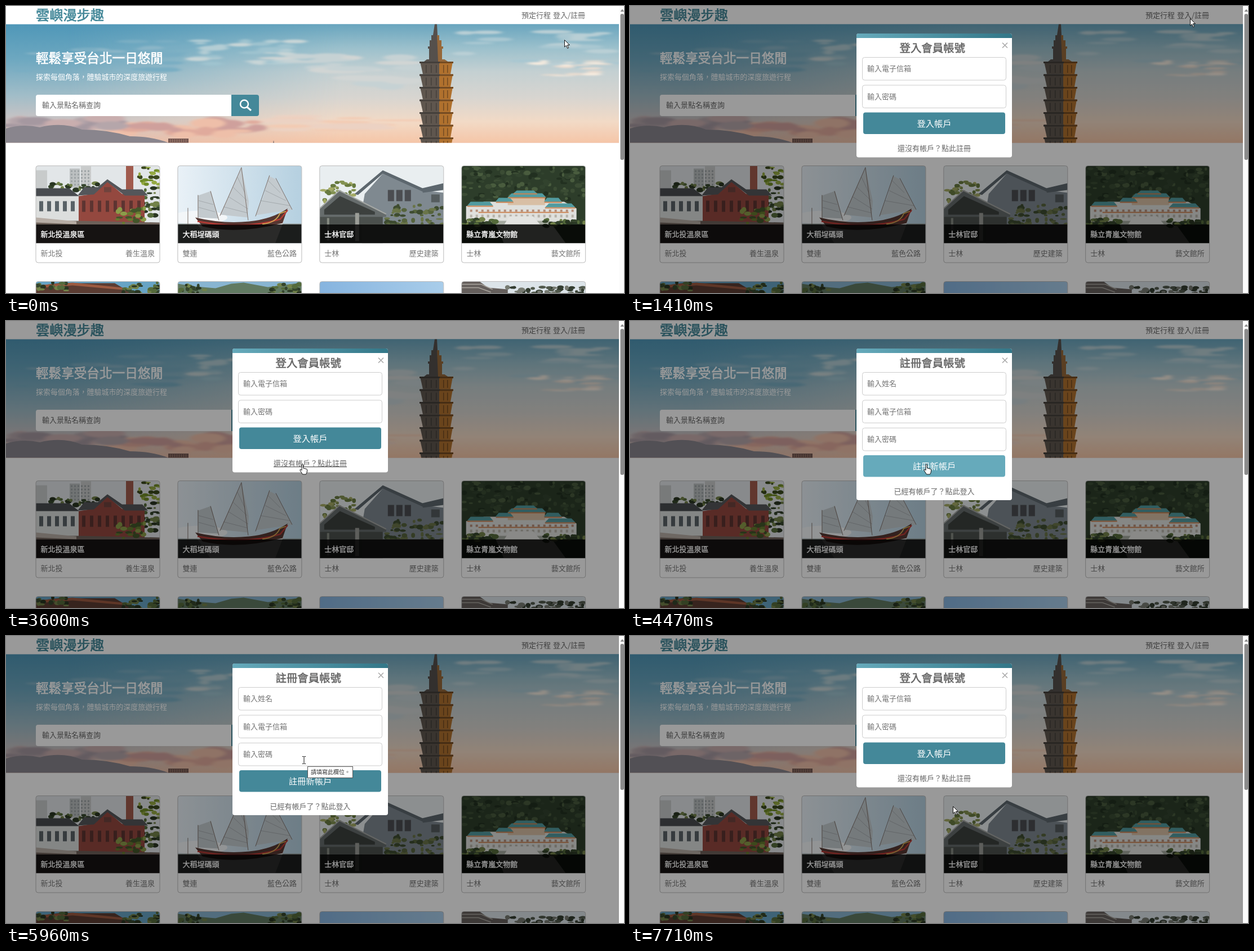
Animation, 1097 px wide and 511 px high, one loop 8000 ms. Source, as an HTML page:

```html
<!DOCTYPE html>
<html lang="zh-Hant">
<head>
<meta charset="utf-8">
<style>
html, body { margin: 0; width: 100%; height: 100%; overflow: hidden; background: #fff; }
svg { display: block; width: 1097px; height: 511px; font-family: "Noto Sans CJK TC", "Noto Sans CJK", sans-serif; }
</style>
</head>
<body>
<svg id="stage" viewBox="0 0 1097 511">
  <defs>
    <linearGradient id="sky" x1="0" y1="0" x2="0" y2="1">
      <stop offset="0" stop-color="#4f97b8"/><stop offset=".3" stop-color="#6ea8c0"/>
      <stop offset=".6" stop-color="#a1bdc8"/><stop offset=".8" stop-color="#c8c3c4"/><stop offset="1" stop-color="#e6bcaa"/>
    </linearGradient>
    <linearGradient id="warm" x1="0" y1="0" x2="0" y2="1">
      <stop offset="0" stop-color="#69a5be"/><stop offset=".2" stop-color="#9bc0cc"/><stop offset=".4" stop-color="#c4d0d2"/>
      <stop offset=".62" stop-color="#d8d5d0"/><stop offset=".82" stop-color="#f2dac6"/><stop offset="1" stop-color="#f5c5a7"/>
    </linearGradient>
    <linearGradient id="reveal"><stop offset=".1" stop-color="#000"/><stop offset=".55" stop-color="#fff"/></linearGradient>
    <mask id="right"><rect y="32" width="1088" height="212" fill="url(#reveal)"/></mask>
    <linearGradient id="bar"><stop offset="0" stop-color="#66aabb"/><stop offset="1" stop-color="#337788"/></linearGradient>
    <linearGradient id="air"><stop offset="0" stop-color="#e9f1f7"/><stop offset="1" stop-color="#b5d0e0"/></linearGradient>
    <linearGradient id="blue"><stop offset="0" stop-color="#86b4df"/><stop offset="1" stop-color="#a9cdea"/></linearGradient>
    <filter id="soft" x="-30%" y="-80%" width="160%" height="260%"><feGaussianBlur stdDeviation="4 1.5"/></filter>
    <clipPath id="heroClip"><rect y="32.5" width="1088" height="211"/></clipPath>
    <clipPath id="photoClip"><path d="M0 138V4q0-4 4-4h212q4 0 4 4v134z"/></clipPath>
  </defs>
  <g id="page"></g>
  <g id="dialog"></g>
  <path d="M1088 0h9v511h-9z" fill="#fcfcfc"/>
  <path d="M1090.500 10l3.500-4.500 3 4.500z" fill="#888"/>
  <rect x="1090.500" y="14" width="6.500" height="260" rx="3" fill="#8b8b8b"/>
  <path id="cursor" stroke="#111" stroke-linejoin="round"/>
</svg>
<script>
const $ = id => document.getElementById(id);
const text = (x, y, size, str, fill = '#666', more = '') =>
  `<text x="${x}" y="${y}" font-size="${size}" fill="${fill}" ${more}>${str}</text>`;
// Medium weight: regular glyphs with a thin outline
const medium = (x, y, size, str, fill) =>
  text(x, y, size, str, fill, `stroke="${fill}" stroke-width="${size * .03}"`);
const shape = (fill, d) => `<path fill="${fill}" d="${d}"/>`;
const line = (color, width, d) => `<path fill="none" stroke="${color}" stroke-width="${width}" d="${d}"/>`;
const box = (x, y, w, h, fill, more = '') =>
  `<rect x="${x}" y="${y}" width="${w}" height="${h}" fill="${fill}" ${more}/>`;
const oval = (x, y, rx, ry, fill) => `<ellipse cx="${x}" cy="${y}" rx="${rx}" ry="${ry}" fill="${fill}"/>`;
const MID = 'text-anchor="middle"';

let seed = 7;
const rnd = () => (seed = seed * 16807 % 2147483647) / 2147483647;

// Ovals scattered inside a rectangle
function scatter(x, y, w, h, n, colors, rx = 4.5, ry = 3) {
  let s = '';
  for (let i = 0; i < n; i++)
    s += oval(x + rnd() * w, y + rnd() * h, rx * (.5 + rnd()), ry * (.5 + rnd()), colors[i % colors.length]);
  return s;
}

function windows(x, y, cols, rows, dx, dy, w, h, fill) {
  let s = '';
  for (let i = 0; i < cols * rows; i++) s += box(x + i % cols * dx, y + Math.floor(i / cols) * dy, w, h, fill);
  return s;
}

function tower() {
  let s = shape('#55504c', 'M761 32h4l1 20h3v9h4v11h3v4h-2v19h4l6 4h-42l5-4h4V76h-2v-4h3V61h3v-9h3z')
    + shape('#96683a', 'M765 52h4v9h4v11h3v4h-2v19h4l6 4h-17z');
  for (let y = 99; y < 244; y += 22.5) {
    s += shape('#5f564e', `M735 ${y}H771V${y + 22.5}H740z`)
      + shape('#b0712e', `M769 ${y}H793L789 ${y + 22.5}H769z`)
      + shape('#443f3b', `M734 ${y}h36v3h-36zM745 ${y + 6}h1.500v14h-1.500zM754 ${y + 6}h1.500v14h-1.500zM763 ${y + 6}h1.500v14h-1.500z`)
      + shape('#744b22', `M770 ${y}h24v3h-24zM776 ${y + 6}h1.500v14h-1.500zM783 ${y + 6}h1.500v14h-1.500z`);
  }
  return s;
}

function hero() {
  const clouds = scatter(30, 60, 280, 60, 26, ['#79adc3', '#8ab5c7'], 24, 3)
    + scatter(330, 62, 190, 42, 30, ['#b4cdd4', '#c8d5d7', '#9fc3cf'], 18, 3)
    + scatter(480, 85, 250, 60, 24, ['#c6d2d4', '#d1d5d4'], 36, 4)
    + scatter(800, 45, 270, 65, 24, ['#b9cfd5', '#a9c7d1'], 28, 3)
    + scatter(940, 97, 120, 30, 18, ['#fbeee0', '#ecddd0'], 15, 1.5)
    + scatter(480, 195, 240, 30, 16, ['#f3cbb3', '#ecd2c3'], 45, 3)
    + scatter(200, 205, 250, 25, 30, ['#e0aa9c', '#cfa09c', '#eebfa9'], 22, 6)
    + scatter(0, 200, 210, 20, 18, ['#b5a6aa', '#a598a0', '#c9aeae'], 26, 6);
  return `<g clip-path="url(#heroClip)">${box(0, 32, 1088, 212, 'url(#sky)')}
    ${box(0, 32, 1088, 212, 'url(#warm)', 'mask="url(#right)"')}
    <g filter="url(#soft)">${clouds}</g>
    ${shape('#89858d', 'M0 218q30-9 60-2 40-10 75 4 45 0 85 12 40 0 70 12H0z')}
    ${shape('#765953', 'M288 236h36v8h-36z')}${windows(291, 237, 8, 1, 4, 4, 1, 7, '#9b7a6b')}
    ${shape('#6c6265', 'M474 244l1-5 1 5z')}${tower()}</g>`
    + medium(53, 101, 22.6, '輕鬆享受台北一日悠閒', '#fff')
    + text(53, 131, 12.95, '探索每個角落，體驗城市的深度旅遊行程', '#fff')
    + box(53, 158, 360, 38, '#fff', 'rx="4"')
    + shape('#448899', 'M400 158h45q4 0 4 4v30q0 4-4 4h-45z')
    + text(64, 181, 13, '輸入景點名稱查詢')
    + `<circle cx="423" cy="174.500" r="7" fill="none" stroke="#fff" stroke-width="2.500"/>` + line('#fff', 3, 'M428 180l7 6');
}

const GREEN = ['#35452c', '#556b3b', '#728249', '#293622'];

const photos = [
  () => box(0, 0, 220, 138, '#e2e6e8')
    + box(60, 5, 18, 34, '#bcc0c1') + box(80, 1, 18, 36, '#c9cbcb') + box(0, 8, 20, 32, '#c8cbcb')
    + windows(62, 8, 6, 5, 6, 6, 3, 3, '#9da3a5') + scatter(22, 31, 90, 14, 24, GREEN)
    + box(160, 0, 13, 50, '#a15b4d') + scatter(192, 38, 28, 52, 26, GREEN)
    + shape('#94483f', 'M76 108V54l26-4 25-22 26 22h40v58z')
    + shape('#54565a', 'M74 53l12-15h24l17-14 26 18h36l10 11h-41l-31-24-24 22z')
    + windows(82, 62, 8, 1, 14, 10, 6, 20, '#5d3431') + box(121, 38, 13, 9, '#70433d')
    + shape('#dcdedd', 'M0 52h76v46H0z') + shape('#494c50', 'M0 40h59l18 14H0z')
    + windows(6, 63, 5, 1, 14, 10, 7, 18, '#596267')
    + shape('#6d6159', 'M0 98h74l146 3v37H0z') + shape('#b7ada5', 'M0 92l72 7v5L0 101z')
    + scatter(145, 75, 50, 28, 22, ['#66792f', '#8b9d49', '#43562a'])
    + scatter(182, 2, 38, 34, 20, ['#718c28', '#95aa42', '#3b491d'], 4, 2.5),

  () => box(0, 0, 220, 138, 'url(#air)') + oval(38, 92, 50, 12, '#f3f6f8')
    + shape('#89908c', 'M0 103h220v35H0z')
    + shape('#c3cace', 'M113 4l-7 16-31 67 49 5 2-29zM162 18l-10 37-14 33 65-10-29-54zM36 92V53l23-8 13 49z')
    + line('#8f9497', .6, 'M106 20l13 28M98 38l25 24M90 55l35 22M81 73l43 11M160 26l22 22M155 44l37 18M147 62l52 9M37 62l26 7M37 74l29 8')
    + line('#7d706a', 1, 'M113 3L75 89M113 3l12 94M163 17l-25 73M174 22l29 56M36 52v44M58 45l15 52M18 75v45')
    + shape('#d1d2cf', 'M35 104q80 13 154-8l-16 42H58z')
    + shape('#553732', 'M31 92q50 12 96 7 40-4 68-23l-9 26q-80 21-142 6z')
    + line('#b73b35', 2.5, 'M35 99q85 15 147-4l13-16') + line('#d2ad54', 1.8, 'M150 104q25-3 31-19l11-4'),

  () => box(0, 0, 220, 138, '#e9eef0') + scatter(0, 28, 62, 36, 36, ['#a5ab66', '#687b40', '#849252'])
    + shape('#7f8990', 'M80 50l32-36 72 30 36 4v60H70z')
    + shape('#5d676e', 'M62 50l50-42 73 33v6l-73-33-44 38zM182 40l38-9v12l-37 5z')
    + windows(121, 43, 3, 1, 15, 12, 11, 20, '#4b4d51') + box(198, 51, 15, 14, '#555c5e')
    + scatter(116, 70, 104, 42, 55, ['#56643d', '#3e4c30', '#6a7549'])
    + shape('#4b504d', 'M0 82h112v56H0z') + shape('#52544f', 'M75 104h145v34H75z')
    + shape('#666c6c', 'M0 77l35-33 83 42v5H0z') + line('#a4a7a4', 2, 'M0 76l35-32 83 42')
    + shape('#3c403e', 'M8 78l28-24 62 28v5H8z')
    + box(63, 84, 7, 50, '#9b9d97') + box(13, 93, 4, 40, '#858a82'),

  () => box(0, 0, 220, 138, '#2d3d2a') + scatter(0, 0, 220, 65, 150, ['#3b4c34', '#223020', '#495c3e', '#32432e'])
    + shape('#dfe0dd', 'M8 72l32-8h142l22 12v24H8z') + shape('#d8bfa5', 'M82 56h66v14H82z')
    + shape('#519ba0', 'M82 56l7-7h54l7 7zM92 49l6-5h30l6 5zM10 71l6-7h34l6 7zM60 64l6-7h20l6 7zM146 64l6-7h20l6 7zM148 74l7-7h40l7 7z')
    + line('#cb8453', 2, 'M83 57h66M10 72h46M148 75h54M61 65h31M147 65h31M92 50h42M30 83h160')
    + windows(15, 78, 19, 1, 10, 9, 4, 4, '#b58e79') + windows(15, 87, 19, 1, 10, 9, 4, 5, '#b7b3aa')
    + shape('#a5aaa0', 'M58 98h98l29 40H75z') + shape('#e3e4e1', 'M85 90h42l12 14H76z')
    + scatter(0, 95, 62, 12, 22, GREEN) + scatter(145, 96, 75, 12, 25, GREEN),

  () => box(0, 0, 220, 22, '#67a4c5') + shape('#5b3c32', 'M0 22V8l40-5h100l32 19z') + shape('#9c5a40', 'M0 7l65-5 90 9v4L65 7 0 12z')
    + scatter(0, 0, 58, 16, 18, GREEN) + scatter(155, 2, 65, 19, 28, GREEN),
  () => box(0, 0, 220, 22, '#88b5d2') + shape('#617a62', 'M0 22V4l32 5 35 3 28-8 22-2 43 8 60-8v20z') + scatter(0, 6, 48, 16, 22, GREEN) + scatter(165, 5, 55, 17, 22, GREEN),
  () => box(0, 0, 220, 22, 'url(#blue)'),
  () => box(0, 0, 220, 22, '#dce4e9') + shape('#655f5c', 'M0 22V0h32l15 11 35 3v8z') + line('#aaa69f', 1.5, 'M0 5h35l20 9M0 11h30l22 8') + scatter(78, 10, 142, 12, 40, ['#51594c', '#343d31', '#777b72'])
];

const labels = [
  ['新北投溫泉區', '新北投', '養生溫泉'], ['大稻埕碼頭', '雙連', '藍色公路'],
  ['士林官邸', '士林', '歷史建築'], ['縣立青嵐文物館', '士林', '藝文館所']
];

function card(draw, i) {
  const x = 53 + i % 4 * 251.9, y = i < 4 ? 284.5 : 490.5, label = labels[i];
  let s = `<g clip-path="url(#photoClip)">${draw()}${label ? box(0, 104.5, 220, 34, '#000', 'opacity=".8"') : ''}</g>`;
  if (label) s += medium(8.5, 126, 13, label[0], '#fff') + text(8.5, 160, 13, label[1], '#757575')
    + text(211, 160, 13, label[2], '#757575', 'text-anchor="end"');
  return `<g transform="translate(${x} ${y})">${s}${box(0, 0, 220, 172.5, 'none', 'rx="4" stroke="#bbb"')}</g>`;
}

$('page').innerHTML = medium(53, 25, 24.2, '雲嶼漫步趣', '#448899')
  + text(915, 21, 13, '預定行程') + text(971, 21, 13, '登入/註冊', '#666', 'id="login"')
  + hero() + photos.map(card).join('');

const forms = {
  login: { title: '登入會員帳號', fields: ['輸入電子信箱', '輸入密碼'], button: '登入帳戶', link: '還沒有帳戶？點此註冊' },
  signup: { title: '註冊會員帳號', fields: ['輸入姓名', '輸入電子信箱', '輸入密碼'], button: '註冊新帳戶', link: '已經有帳戶了？點此登入' }
};

function dialog(form, buttonColor, underline, tip) {
  const y = 91 + form.fields.length * 49.5;
  return box(0, 0, 1088, 511, '#000', 'opacity=".4"')
    + box(402, 49, 276, y + 30.5, '#fff', 'rx="4"')
    + shape('url(#bar)', 'M402 57v-4q0-4 4-4h268q4 0 4 4v4z')
    + medium(478.5, 81.5, 19.4, form.title, '#666')
    + line('#aaa', 1.6, 'M661 65.500l9 9m0-9l-9 9')
    + form.fields.map((f, i) => box(412.5, 91.5 + i * 49.5, 255, 40.5, '#fff', 'rx="4" stroke="#ccc"')
      + text(421, 116 + i * 49.5, 13, f, '#757575')).join('')
    + box(414, y - .5, 252, 38.5, buttonColor, 'rx="4"')
    + text(540, y + 24.5, 15.3, form.button, '#fff', MID)
    + text(540, y + 68, 13, form.link, '#666', MID + (underline ? ' text-decoration="underline"' : ''))
    + (tip ? box(535.5, 232.5, 80, 20, '#fff', 'stroke="#555"') + text(541, 246.3, 10, '請填寫此欄位。', '#333') : '');
}

const pointers = {
  arrow: ['#fff', 'M.500.500V13l3-2.700 2.200 5.200 2-.900L5.500 9.500h4z'],
  hand: ['#fff', 'M-1 1.500q1.200-1.500 2.500 0V8l5.500 1.300q2 .700 1.700 2.700l-.700 4-1.500 3H.500L-4 12q-.500-2.300 1.500-1.500L-1 12z'],
  beam: ['none', 'M-3 .500h2.500M.500.500H3M0 1v12M-3 13.500h2.500M.500 13.500H3']
};

// start time, pointer, hot spot
const moves = [
  [0, 'arrow', 991, 60], [500, 'arrow', 991, 52], [650, 'hand', 994, 22], [1410, 'arrow', 994, 22],
  [2250, 'arrow', 927, 143], [2400, 'arrow', 858, 192], [2530, 'arrow', 799, 232], [2680, 'arrow', 761, 242],
  [2980, 'arrow', 746, 240], [3130, 'arrow', 556, 265], [3280, 'arrow', 525, 268], [3450, 'hand', 526, 256],
  [3600, 'hand', 526, 254], [5230, 'beam', 529, 216], [5510, 'beam', 529, 214], [6400, 'beam', 535, 214],
  [6550, 'hand', 565, 278], [6700, 'hand', 583, 303], [6850, 'hand', 577, 305], [7000, 'hand', 574, 304],
  [7150, 'hand', 573, 303], [7710, 'arrow', 573, 303]
];

let shown;
function draw() {
  const t = performance.now() % 8000;
  const during = (a, b) => t >= a && t < b;
  const move = moves.findLast(m => m[0] <= t);
  const signup = during(4470, 7710);
  const color = during(4470, 5230) ? '#66aabb' : during(5230, 5360) || during(6550, 6700) ? '#5599aa' : '#448899';
  const underline = during(3450, 4470) || during(6700, 7710);
  const html = t < 1410 ? '' : dialog(signup ? forms.signup : forms.login, color, underline, during(5960, 6550));
  if (html !== shown) $('dialog').innerHTML = shown = html;
  $('login').setAttribute('opacity', during(650, 1410) ? .6 : 1);
  const [fill, d] = pointers[move[1]], c = $('cursor');
  c.setAttribute('fill', fill);
  c.setAttribute('d', d);
  c.setAttribute('transform', `translate(${move[2]} ${move[3]})`);
  requestAnimationFrame(draw);
}
draw();
</script>
</body>
</html>
```
